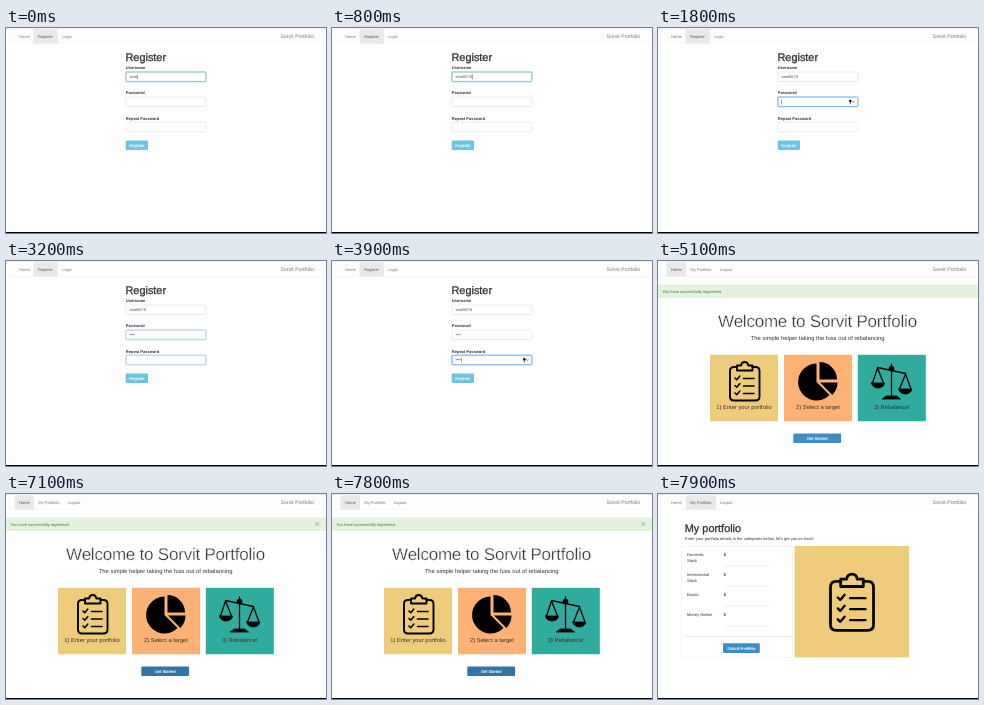
These frames come from a looping animation (320x205 px, 8 s). An HTML page:

```html
<!DOCTYPE html>
<html lang="en">
<head>
<meta charset="utf-8">
<title>Portfolio sign-up</title>
<style>
html, body { margin: 0; width: 100%; height: 100%; overflow: hidden; background: #fff; }
svg { display: block; width: 320px; height: 205px; }
text { font: 4.03px "Liberation Sans", Arial, sans-serif; fill: #333; text-rendering: geometricPrecision; white-space: pre; }
.nav { fill: #777; }
.nav.on { fill: #555; }
.brand { font-size: 5.18px; fill: #777; text-anchor: end; }
.heading { font-size: 10.9px; stroke: #333; stroke-width: .32; }
.bold { font-weight: bold; }
.value { fill: #555; }
.mid { text-anchor: middle; }
.white { fill: #fff; stroke: #fff; stroke-width: .1; }
.welcome { font-size: 17px; letter-spacing: -.22px; stroke: #fff; stroke-width: .35; }
.lead { font-size: 5.85px; }
.card { font-size: 5.75px; }
.flash { fill: #3c763d; }
.icon { fill: none; stroke: #000; stroke-width: 1.9; stroke-linecap: round; stroke-linejoin: round; }
.field { fill: #fff; stroke: #d8d8d8; stroke-width: .5; }
.line { stroke: #ddd; stroke-width: .5; }
</style>
</head>
<body>
<svg viewBox="0 0 320 205">
  <defs>
    <g id="clipboard" class="icon">
      <path d="M79 106H76Q72 106 72 110V135.500Q72 139.500 76 139.500H97.500Q101.500 139.500 101.500 135.500V110Q101.500 106 97.500 106H94.500"/>
      <path d="M79 109.500V104.500H83Q83.500 101 86.700 101T90.400 104.500H94.500V109.500Z"/>
      <path d="M77 117l1.700 1.700 3-3.500M77 124.500l1.700 1.700 3-3.500M77 132l1.700 1.700 3-3.500M85.500 117.500h10.500M85.500 125h10.500M85.500 132.500h10.500" stroke-width="1.600"/>
    </g>
  </defs>
  <rect width="320" height="205" fill="#fff"/>
  <g id="register"></g>
  <g id="home"></g>
  <g id="portfolio"></g>
  <rect y="204" width="320" height="1" fill="#000"/>
</svg>
<script>
const LOOP = 8000, FRAME = 100;
const TEXT_X = 123.4, USER = "seat", DIGITS = "5678", USER_WIDTH = 7.6;
const BRAND = "Sorvit Portfolio";
const byId = id => document.getElementById(id);
const label = (x, y, str, cls = "") => `<text x="${x}" y="${y}" class="${cls}">${str}</text>`;
const box = (x, y, w, h, fill, extra = "") =>
  `<rect x="${x}" y="${y}" width="${w}" height="${h}" fill="${fill}" ${extra}/>`;

// Each link: [caption, text x, tab x, tab width]
function navbar(links, active) {
  return box(0, 0, 320, 15.5, "#fdfdfd") + box(0, 0, 320, .5, "#e2e2e2") + box(0, 15.4, 320, .4, "#eee") +
    links.map(([name, x, tabX, width], i) =>
      (i === active ? box(tabX, 1.3, width, 14.2, "#e9e9e9") : "") +
      label(x, 10.2, name, i === active ? "nav on" : "nav")).join("") +
    label(308.2, 10.4, BRAND, "brand");
}

const button = (id, x, y, w, str, fill) =>
  box(x, y, w, 9.7, fill, `id="${id}" rx="1.1"`) + label(x + w / 2, y + 6.3, str, "mid white");

const fields = [
  { name: "Username", y: 44, typed: [200, 300, 600, 800], focus: -200, blur: 1700, caretOff: 1300, glow: "#74bfc6" },
  { name: "Password", y: 69, typed: [2100, 2300, 2500, 2700], focus: 1700, blur: 3200, caretOff: 3200, glow: "#66afe9" },
  { name: "Repeat Password", y: 94.2, typed: [3400, 3600, 3700, 3900], focus: 3200, blur: 4600, caretOff: 4400, glow: "#66afe9" }
];

const fieldMarkup = ({ name, y, glow }, i) =>
  label(119.8, y - 2.7, name, "bold") +
  `<rect class="field" x="119.9" y="${y}" width="80" height="9.600" rx="1"/>
  <g id="glow${i}" fill="none" stroke="${glow}">
    <rect x="119.9" y="${y}" width="80" height="9.600" rx="1" stroke-width="1.600" opacity=".3"/>
    <rect x="119.9" y="${y}" width="80" height="9.600" rx="1" stroke-width=".7"/>
  </g>
  <text id="value${i}" class="value" x="${TEXT_X}" y="${y + 6.2}"></text>` +
  box(TEXT_X, y + 2.4, .5, 5, "#444", `id="caret${i}"`) +
  (i ? `<g id="key${i}"><circle cx="192.300" cy="${y + 4}" r="1.300"/>
    <path d="M192.300 ${y + 4}v3.200M194.500 ${y + 4.3}l.8.900.8-.9" fill="none" stroke="#000" stroke-width=".7"/></g>` : "");

byId("register").innerHTML =
  navbar([["Home", 13, 8.5, 19.5], ["Register", 32, 27.5, 24.3], ["Login", 56, 51.8, 18]], 1) +
  label(119.5, 32.5, "Register", "heading") +
  fields.map(fieldMarkup).join("") +
  button("send", 119.7, 112.4, 22.3, "Register", "#6bc5e0");

const userLinks = [["Home", 13, 8.5, 19.5], ["My Portfolio", 32.3, 28, 30], ["Logout", 62, 58, 21]];
const card = (x, fill, str) =>
  box(x, 93.8, 68, 66.4, fill) + label(x + 34, 147.7, str, "card mid");

byId("home").innerHTML =
  navbar(userLinks, 0) +
  box(0, 23.5, 320, 13.5, "#e3f1dd") +
  label(4.3, 31.7, "You have successfully registered.", "flash") +
  `<path id="close" d="M309.400 28.300l3.800 3.800M313.200 28.300l-3.800 3.800" stroke="#7f9a79" stroke-width=".7"/>` +
  label(159.5, 66.2, `Welcome to ${BRAND}`, "welcome mid") +
  label(159.700, 79.3, "The simple helper taking the fuss out of rebalancing", "lead mid") +
  card(52, "#efcc7b", "1) Enter your portfolio") +
  card(126, "#feb175", "2) Select a target") +
  card(199.8, "#2fac9d", "3) Rebalance!") +
  `<use href="#clipboard"/>
  <path d="M158.500 121V102.500A18.500 18.500 0 1 0 171.600 134.100ZM161.500 118.500V101A17.500 17.500 0 0 1 179 118.500ZM162 121.500H179.500A17.500 17.500 0 0 1 174.400 133.900Z"/>
  <g class="icon">
    <path d="M233.500 103V136M219.500 106.500L247.500 112.500M219.500 107L214.500 122M219.500 107L225.500 122M247.500 113L241.500 128M247.500 113L253 128" stroke-width="1.300"/>
    <circle cx="233.500" cy="107.500" r="2.800" fill="#000" stroke="none"/>
    <path d="M213.500 122H226.500A6.500 5 0 0 1 213.500 122ZM240.800 128H253.800A6.500 5 0 0 1 240.800 128ZM224.500 138H242.500L238.500 135H228.500Z" fill="#000" stroke-width=".8"/>
  </g>` +
  button("start", 135.3, 172.4, 47.8, "Get Started", "#3f8dc2");

const holdings = [["Domestic", "Stock"], ["International", "Stock"], ["Bonds"], ["Money Market"]];
byId("portfolio").innerHTML =
  navbar(userLinks, 1) +
  label(26.8, 38.3, "My portfolio", "heading") +
  label(27, 46, "Enter your portfolio details in the categories below, let's get you on track!") +
  `<rect x="23.700" y="52.200" width="110.500" height="111" fill="none" stroke="#e8e8e8" stroke-width=".5"/>` +
  holdings.map((lines, i) => {
    const y = 62.4 + i * 20;
    return lines.map((str, n) => label(29, y + n * 5.8, str)).join("") +
      label(65.8, y, "$", "bold") + `<path class="line" d="M66 ${y + 9.8}H112"/>`;
  }).join("") +
  `<path class="line" d="M26 142.500H134" stroke-width=".9"/>` +
  button("submit", 65, 149.2, 36.8, "Submit Portfolio", "#3f8dc2") +
  box(136.6, 52, 114.4, 111.4, "#efcc7b") +
  `<use href="#clipboard" transform="translate(194 108.200) scale(1.460) translate(-86.750 -120.250)"/>`;

const show = (id, on) => byId(id).setAttribute("visibility", on ? "inherit" : "hidden");
const ramp = (t, start) => Math.min(1, Math.max(0, (t - start + FRAME) / 200));

function drawField({ typed, focus, blur, caretOff }, i, t) {
  const count = typed.filter(start => t >= start).length;
  const step = i ? 1.41 : 2.24;
  byId("value" + i).textContent = i ? "•".repeat(count) : USER + DIGITS.slice(0, count);
  byId("caret" + i).setAttribute("x", TEXT_X + (i ? 0 : USER_WIDTH) + step * count);
  show("caret" + i, t >= focus + FRAME && t < caretOff);
  byId("glow" + i).setAttribute("opacity", ramp(t, focus) - ramp(t, blur));
  if (i) show("key" + i, t >= focus + FRAME && t < blur);
}

function draw(now) {
  const t = Math.floor(now % LOOP / FRAME) * FRAME;
  show("register", t < 5100);
  show("home", t >= 5100 && t < 7900);
  show("portfolio", t >= 7900);
  fields.forEach((field, i) => drawField(field, i, t));
  byId("send").setAttribute("fill", t < 4400 ? "#6bc5e0" : "#3fb3d3");
  show("close", t >= 5200);
  byId("start").setAttribute("fill", t < 7100 ? "#3f8dc2" : "#3274a5");
}

let origin;
function tick(now) {
  origin ??= now;
  draw(now - origin);
  requestAnimationFrame(tick);
}
draw(0);
requestAnimationFrame(tick);
</script>
</body>
</html>
```
